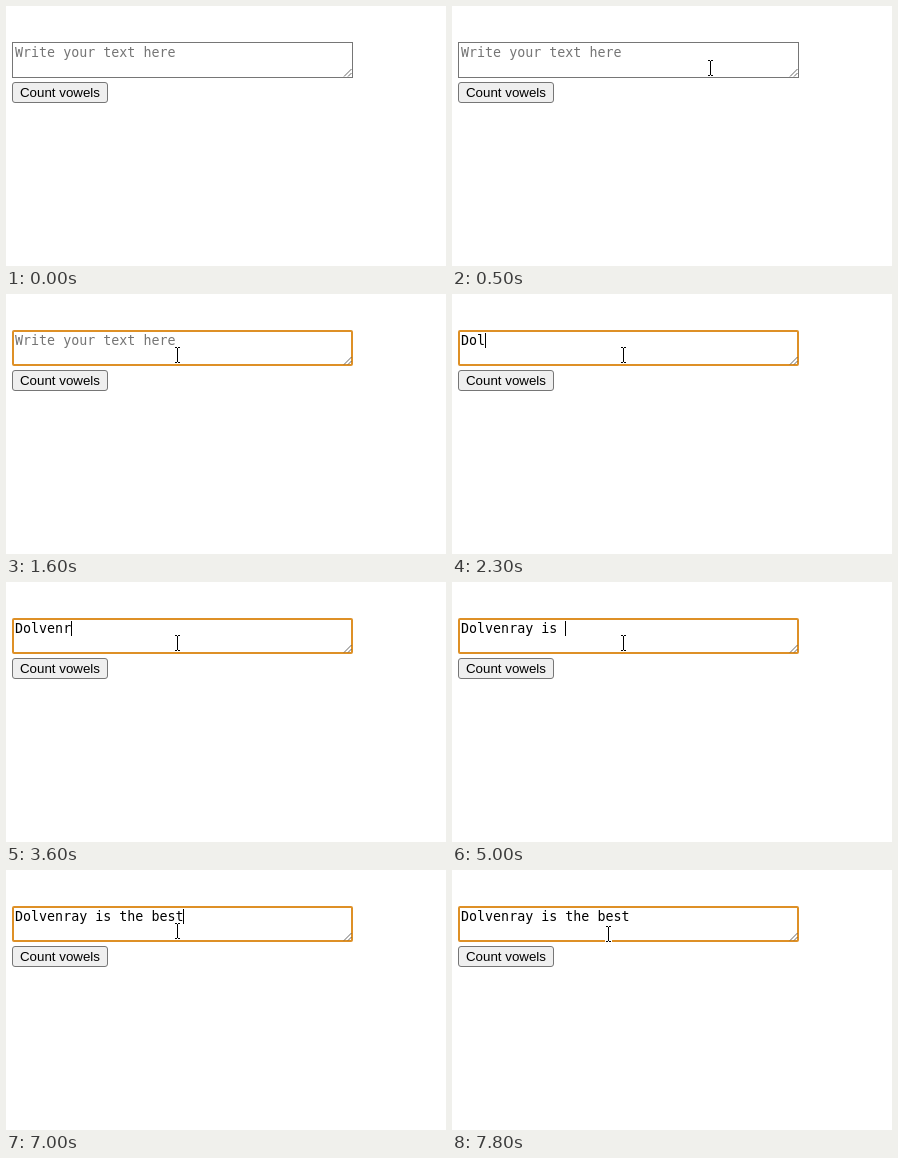
Write an HTML page that moves like this. It is 440 px wide and 260 px high and loops after 8 s.

```html
<!DOCTYPE html>
<html lang="en">
<head>
<meta charset="utf-8">
<title>Vowel counter</title>
<style>
  html, body { margin: 0; width: 100%; height: 100%; overflow: hidden; background: #fff; }
  div, svg { position: absolute; box-sizing: border-box; }
  #stage { left: 0; top: 0; width: 440px; height: 260px; overflow: hidden; }
  #field {
    left: 6px; top: 36px; width: 341px; height: 36px;
    border: 1px solid #767676; background: #fff;
  }
  #field.focus { border: 2px solid #de9026; border-radius: 2px; }
  #text {
    left: 9px; top: 39px; height: 15px; color: #000;
    font: 13.3333px/15px "DejaVu Sans Mono", monospace; white-space: pre;
  }
  #text.hint { color: #757575; }
  #caret { top: 39px; width: 1px; height: 15px; background: #000; }
  #button {
    left: 6px; top: 76px; width: 96px; height: 21px;
    border: 1px solid #767676; border-radius: 3px; background: #efefef; color: #000;
    font: 13.3333px/19px "Liberation Sans", Arial, sans-serif;
    text-align: center; white-space: nowrap;
  }
  svg { left: 0; top: 0; }
</style>
</head>
<body>
<div id="stage">
  <div id="field"></div>
  <div id="text"></div>
  <div id="caret"></div>
  <div id="button">Count vowels</div>
  <svg width="440" height="260" viewBox="0 0 440 260">
    <path d="M338 70.5L345.5 63M342 70.5L345.5 67" fill="none" stroke="#555" stroke-width=".9"/>
    <g id="beam" shape-rendering="crispEdges">
      <path d="M-3 -9H4V-6H2V6H4V9H-3V6H-1V-6H-3Z" fill="#fff"/>
      <path d="M-2 -8H0V-7H1V-8H3V-7H1V7H3V8H1V7H0V8H-2V7H0V-7H-2Z" fill="#000"/>
    </g>
    <path id="arrow" d="M.5 .5V15.5L4 12.2L6.4 17.5L8.8 16.4L6.4 11.3H11.2Z" fill="#000" stroke="#fff"/>
  </svg>
</div>
<script>
  const LOOP = 8000, ADVANCE = 8.027;
  const HINT = "Write your text here", PHRASE = "Dolvenray is the best";
  const FOCUS = 1000;

  // Key presses, in tenths of a second
  const keys = [20, 22, 23, 26, 29, 33, 36, 38, 40, 43, 45, 47, 50, 56, 58, 60, 62, 64, 65, 67, 70];

  // Pointer stops: tenths of a second, x, y
  const stops = [
    [2, 361, 9], [3, 335, 24], [4, 300, 45], [5, 258, 62], [6, 217, 74],
    [7, 190, 70], [8, 176, 64], [9, 172, 62], [11, 170, 63], [12, 167, 58],
    [13, 171, 61], [77, 163, 62], [78, 156, 64]
  ];

  const [field, text, caret, beam, arrow] =
    ["field", "text", "caret", "beam", "arrow"].map(id => document.getElementById(id));

  const show = (el, on) => { el.style.visibility = on ? "visible" : "hidden"; };

  function drawPointer(tick) {
    const stop = stops.filter(s => s[0] <= tick).pop();
    const [, x, y] = stop || [0, 0, 0];
    const inside = x >= 6 && x < 347 && y >= 36 && y < 72;
    show(beam, stop && inside);
    show(arrow, stop && !inside);
    (inside ? beam : arrow).setAttribute("transform", `translate(${x} ${y})`);
  }

  function draw(ms) {
    const tick = ms / 100;
    const typed = keys.filter(k => k <= tick).length;
    field.className = ms >= FOCUS ? "focus" : "";
    text.className = typed ? "" : "hint";
    text.textContent = typed ? PHRASE.slice(0, typed) : HINT;
    caret.style.left = Math.floor(9 + typed * ADVANCE) + "px";
    show(caret, (ms >= FOCUS && ms < 1600) || (ms >= 2000 && ms < 7500));
    drawPointer(tick);
  }

  const start = performance.now();
  function frame() {
    draw((performance.now() - start) % LOOP);
    requestAnimationFrame(frame);
  }
  frame();
</script>
</body>
</html>
```
